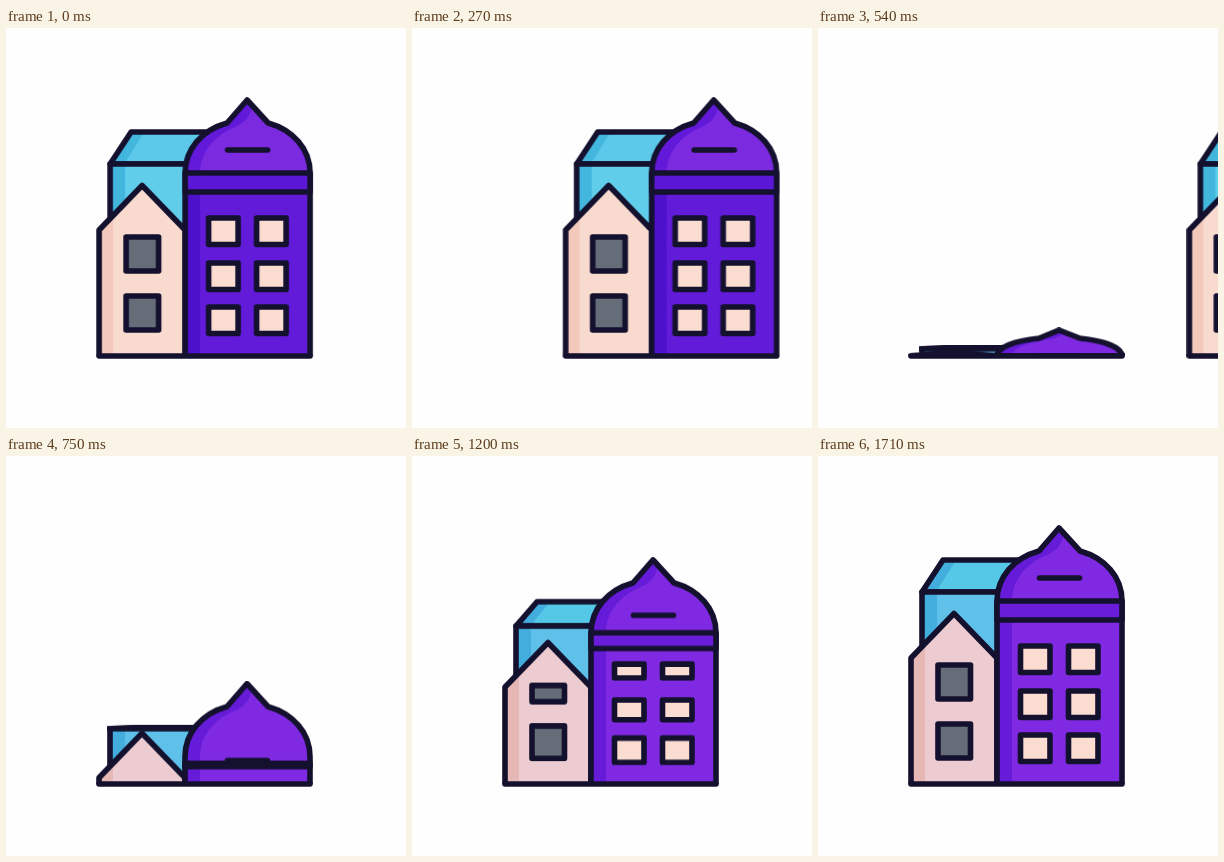
Recreate the animation shown at these times as an HTML page without scripts. Size 400x400 px, loop 3740 ms.

```html
<!DOCTYPE html>
<html lang="en">
<head>
<meta charset="utf-8">
<title>City buildings</title>
<style>
  html, body { margin: 0; height: 100%; overflow: hidden; background: #fefefe; }
  svg { display: block; width: 100%; height: 100%; }

  .leave {
    --wall: #f8dacf; --wall-dim: #f2c9bb; --roof: #5cc9ea; --front: #60ceeb; --front-dim: #43b6de;
    --dome: #7b2ae0; --dome-dim: #6219da; --body: #621bd9; --body-dim: #4d10cb; --band: #5a18d6;
  }
  .grow {
    --wall: #ecccd0; --wall-dim: #e6b8b5; --roof: #56c8e7; --front: #5fc0e9; --front-dim: #43addd;
    --dome: #7f2ae2; --dome-dim: #651bd8; --body: #7f2ae2; --body-dim: #651bd8; --band: #691dd9;
  }
  .ink {
    fill: none; stroke: #14112f; stroke-width: 5.6;
    stroke-linecap: round; stroke-linejoin: round; vector-effect: non-scaling-stroke;
  }

  .leave, .grow, .grow .part { animation: 3740ms linear infinite; }
  .leave { animation-name: leave; }
  .grow { animation-name: show; }
  .grow .block { animation-name: block; }
  .grow .roof { animation-name: roof; transform-origin: 0 136px; }
  .grow .house { animation-name: house; transform-origin: 0 202px; }
  .grow .dome { animation-name: dome; transform-origin: 0 145px; }
  .grow .band { animation-name: band; transform-origin: 0 145px; }
  .grow .slot { animation-name: slot; }
  .grow .row1 { animation-name: row1; transform-origin: 0 190px; }
  .grow .row2 { animation-name: row2; transform-origin: 0 235px; }
  .grow .row3 { animation-name: row3; transform-origin: 0 279px; }
  .grow .pane1 { animation-name: pane1; transform-origin: 0 209px; }
  .grow .pane2 { animation-name: pane2; transform-origin: 0 268px; }

  /* slide out to the right, accelerating */
  @keyframes leave {
    0% { transform: none; visibility: visible; }
    3.61% { transform: translateX(13px); }
    7.22% { transform: translateX(60px); }
    10.83% { transform: translateX(147px); }
    14.44% { transform: translateX(277px); }
    15.24% { transform: translateX(320px); visibility: visible; }
    15.25%, 100% { transform: translateX(320px); visibility: hidden; }
  }
  @keyframes show {
    0%, 11.9% { visibility: hidden; }
    12%, 100% { visibility: visible; }
  }

  /* rise out of the ground, slowing down */
  @keyframes block {
    0%, 12% { transform: translateY(192px); }
    14.44% { transform: translateY(185px); }
    20.05% { transform: translateY(137px); }
    26.47% { transform: translateY(78px); }
    29.68% { transform: translateY(50px); }
    32.89% { transform: translateY(29px); }
    38.5% { transform: translateY(10px); }
    41.7% { transform: translateY(3px); }
    45.72%, 100% { transform: none; }
  }
  @keyframes roof {
    0%, 20.05% { transform: scaleY(.03); }
    26.47% { transform: scaleY(.47); }
    32.89% { transform: scaleY(.8); }
    38.5% { transform: scaleY(.94); }
    45.72%, 100% { transform: scaleY(1); }
  }
  @keyframes house {
    0%, 12% { transform: translateY(126px) scaleY(0); }
    14.44% { transform: translateY(126px) scaleY(.1); }
    19.3% { transform: translateY(126px) scaleY(.93); }
    20.05% { transform: translateY(120px) scaleY(1); }
    26.47% { transform: translateY(66px) scaleY(1); }
    29.68% { transform: translateY(42px) scaleY(1); }
    32.89% { transform: translateY(25px) scaleY(1); }
    38.5% { transform: translateY(7px) scaleY(1); }
    41.7% { transform: translateY(2px) scaleY(1); }
    45.72%, 100% { transform: translateY(0) scaleY(1); }
  }
  @keyframes dome {
    0%, 11.2% { transform: translateY(183px) scaleY(0); }
    14.44% { transform: translateY(183px) scaleY(.35); }
    16.04% { transform: translateY(183px) scaleY(.63); }
    18.05% { transform: translateY(183px) scaleY(1); }
    20.05% { transform: translateY(156px) scaleY(1); }
    23.26% { transform: translateY(114px) scaleY(1); }
    26.47% { transform: translateY(75px) scaleY(1); }
    29.68% { transform: translateY(47px) scaleY(1); }
    32.89% { transform: translateY(27px) scaleY(1); }
    38.5% { transform: translateY(6px) scaleY(1); }
    41.7% { transform: translateY(2px) scaleY(1); }
    45.72%, 100% { transform: translateY(0) scaleY(1); }
  }
  @keyframes band {
    0%, 14.44% { transform: translateY(183px) scaleY(0); }
    20.05% { transform: translateY(163px) scaleY(.16); }
    23.26% { transform: translateY(116px) scaleY(.38); }
    26.47% { transform: translateY(75px) scaleY(.63); }
    29.68% { transform: translateY(47px) scaleY(.75); }
    32.89% { transform: translateY(27px) scaleY(.85); }
    38.5% { transform: translateY(6px) scaleY(.95); }
    41.7% { transform: translateY(2px) scaleY(.98); }
    45.72%, 100% { transform: translateY(0) scaleY(1); }
  }
  @keyframes slot {
    0%, 14.44% { transform: translateY(206px); }
    20.05% { transform: translateY(183px); }
    23.26% { transform: translateY(130px); }
    26.47% { transform: translateY(85px); }
    29.68% { transform: translateY(54px); }
    32.89% { transform: translateY(32px); }
    38.5% { transform: translateY(7px); }
    41.7% { transform: translateY(2px); }
    45.72%, 100% { transform: none; }
  }

  /* windows open from the lowest row up */
  @keyframes row1 {
    0%, 27% { transform: translateY(45px) scaleY(0); }
    32.89% { transform: translateY(14px) scaleY(.6); }
    38.5% { transform: translateY(2px) scaleY(.92); }
    45.72%, 100% { transform: translateY(0) scaleY(1); }
  }
  @keyframes row2 {
    0%, 23.26% { transform: translateY(45px) scaleY(0); }
    26.47% { transform: translateY(22px) scaleY(.38); }
    36%, 100% { transform: translateY(0) scaleY(1); }
  }
  @keyframes row3 {
    0%, 21.4% { transform: translateY(39px) scaleY(0); }
    26.47% { transform: translateY(14px) scaleY(.62); }
    33.7%, 100% { transform: translateY(0) scaleY(1); }
  }
  @keyframes pane1 {
    0%, 27% { transform: translateY(50px) scaleY(0); }
    32.89% { transform: translateY(16px) scaleY(.55); }
    38.5% { transform: translateY(2px) scaleY(.94); }
    45.72%, 100% { transform: translateY(0) scaleY(1); }
  }
  @keyframes pane2 {
    0%, 20.8% { transform: translateY(45px) scaleY(0); }
    26.47% { transform: translateY(9px) scaleY(.8); }
    33.7%, 100% { transform: translateY(0) scaleY(1); }
  }
</style>
</head>
<body>
<svg viewBox="0 0 400 400">
  <defs>
    <clipPath id="above"><rect width="400" height="328"/></clipPath>

    <g id="roof">
      <path d="M104 136L125 104H215V136Z" style="fill:var(--roof)"/>
      <path d="M104 136L125 104H138L118 136Z" style="fill:var(--front-dim)"/>
      <path class="ink" d="M104 136L125 104H215V136Z"/>
    </g>
    <g id="front">
      <path d="M104 136H215V340H104Z" style="fill:var(--front)"/>
      <path d="M104 136H119V340H104Z" style="fill:var(--front-dim)"/>
      <path class="ink" d="M104 136H215V340H104Z"/>
    </g>
    <g id="house">
      <path d="M93 340V202L136 157L179 202V340Z" style="fill:var(--wall)"/>
      <path d="M93 340V202L107 188V340Z" style="fill:var(--wall-dim)"/>
      <path class="ink" d="M93 340V202L136 157.500L179 202V340Z"/>
    </g>
    <g id="dome">
      <path d="M179 145C179 121 196 102 221 95L241 72L262 95C287 102 304 121 304 145Z" style="fill:var(--dome)"/>
      <path d="M179 145C179 121 196 102 221 95L241 72L246 78C243 91 237 95 229 99C207 108 194 125 194 145Z" style="fill:var(--dome-dim)"/>
      <path d="M179 144.500H304V340H179Z" style="fill:var(--body)"/>
      <path d="M179 144.500H194V340H179Z" style="fill:var(--body-dim)"/>
      <path class="ink" d="M179 340V145C179 121 196 102 221 95L241 72L262 95C287 102 304 121 304 145V340Z"/>
    </g>
    <rect id="band" class="ink" x="179" y="145" width="125" height="19" style="fill:var(--band)"/>
    <path id="slot" class="ink" d="M221.500 122H261.500"/>
    <path id="row" class="ink" d="M202.500 0h29.500v26.500h-29.500zM250.500 0h29.500v26.500h-29.500z" style="fill:#fadcd0"/>
    <rect id="pane" class="ink" x="120" width="32.500" height="34" style="fill:#656d78"/>
    <path id="ground" class="ink" d="M93 328H304"/>
  </defs>

  <g class="grow">
    <g clip-path="url(#above)">
      <g class="part block">
        <use class="part roof" href="#roof"/>
        <use href="#front"/>
      </g>
      <use class="part house" href="#house"/>
      <use class="part pane1" href="#pane" y="209"/>
      <use class="part pane2" href="#pane" y="268"/>
      <use class="part dome" href="#dome"/>
      <use class="part band" href="#band"/>
      <use class="part slot" href="#slot"/>
      <use class="part row1" href="#row" y="190"/>
      <use class="part row2" href="#row" y="235"/>
      <use class="part row3" href="#row" y="279"/>
    </g>
    <use href="#ground"/>
  </g>

  <g class="leave">
    <g clip-path="url(#above)">
      <use href="#roof"/>
      <use href="#front"/>
      <use href="#house"/>
      <use href="#pane" y="209"/>
      <use href="#pane" y="268"/>
      <use href="#dome"/>
      <use href="#band"/>
      <use href="#slot"/>
      <use href="#row" y="190"/>
      <use href="#row" y="235"/>
      <use href="#row" y="279"/>
    </g>
    <use href="#ground"/>
  </g>
</svg>
</body>
</html>
```
